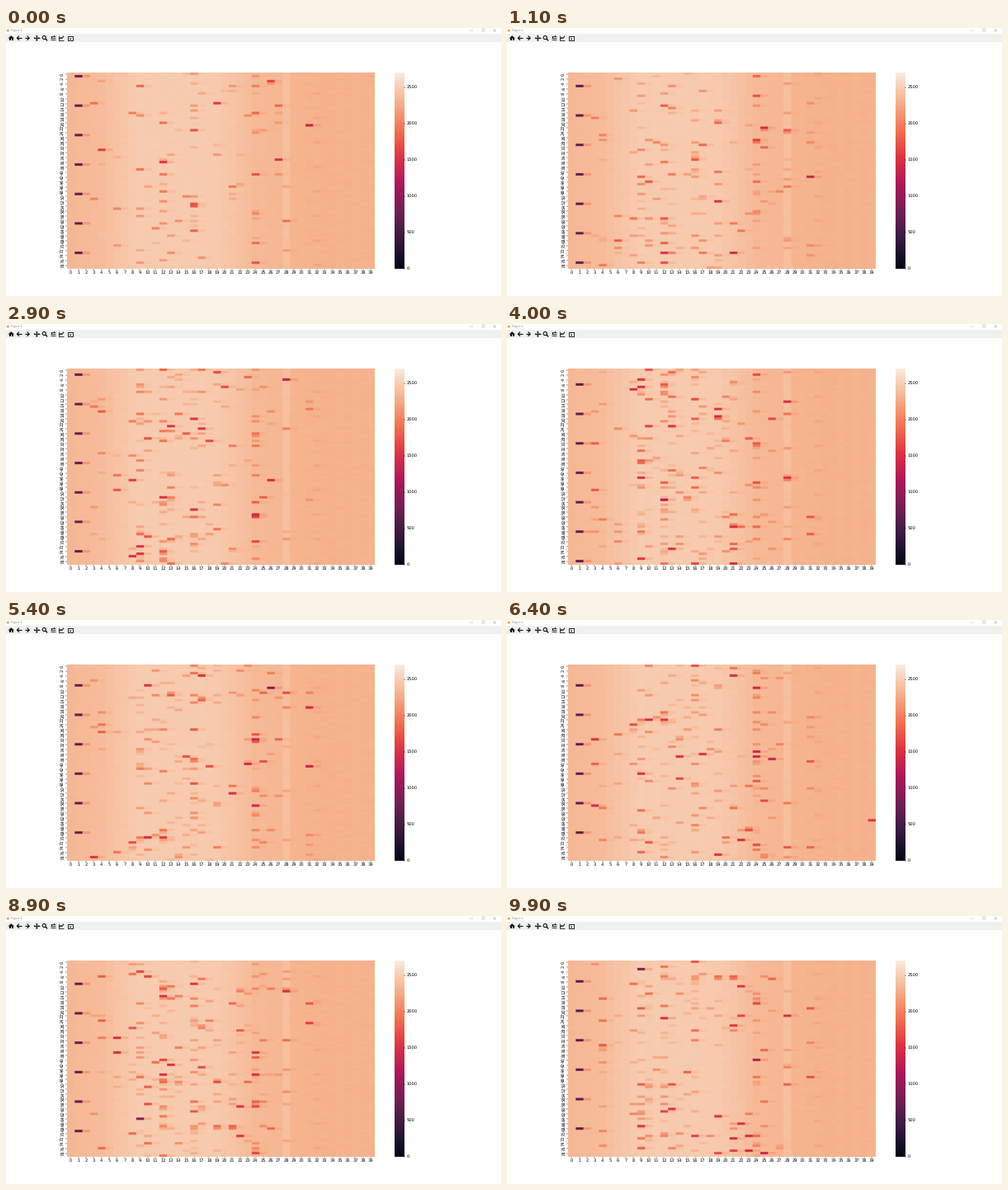
Recreate the animation shown at these times as a matplotlib script. Size 600 px wide and 325 px high, loop 10 s.

```python
import numpy as np
import matplotlib.pyplot as plt
from matplotlib.animation import FuncAnimation
from matplotlib.collections import LineCollection
from matplotlib.colors import LinearSegmentedColormap
from matplotlib.patches import Circle, Polygon, Rectangle

plt.rcParams["text.hinting"] = "no_hinting"
plt.rcParams["font.family"] = "DejaVu Sans"

W, H, DPI = 600, 325, 100
ROWS, COLS, VMAX = 80, 40, 2700
LEFT, RIGHT, TOP, BOTTOM = 73.8, 446.8, 54.4, 292.0
BAR_L, BAR_R = 470.8, 482.4
PX = 72 / DPI
LABEL = 5.1 * PX
INK, GREY = "#111111", "#8c8c8c"

# Scroll position in rows at a few ticks, and the ticks on which it stalls
TICKS = [0, 20, 40, 54, 64, 77, 99]
STARTS = [0, 123, 247, 329, 377, 458, 593]
STALLS = {30, 34, 46, 49, 52, 55, 58, 69, 73, 76, 88}

CMAP = LinearSegmentedColormap.from_list("ember", [
    (0, "#03051a"), (1 / 7, "#35193e"), (2 / 7, "#701f57"), (3 / 7, "#ad1759"),
    (4 / 7, "#e13342"), (5 / 7, "#f37651"), (6 / 7, "#f6b48f"), (1, "#faebdd")])

# Share of rows with a weak reading, by how busy the column is
BUSY = {0.22: (9, 12, 16, 24), 0.09: (4, 10, 13, 14, 17, 19, 21, 28),
        0.04: (3, 6, 8, 11, 15, 18, 20, 22, 23, 25, 26, 27, 31)}
# The few deepest drops: row, column, level
DEEP = [(35, 27, 1500), (183, 28, 1300), (300, 12, 1200), (338, 26, 900),
        (440, 39, 1550), (487, 16, 900), (596, 9, 900), (633, 24, 1250)]


def build_log():
    """All readings that pass through the window, one row per sample."""
    rng = np.random.default_rng(12)
    n = STARTS[-1] + ROWS
    level = np.interp(np.arange(COLS), [0, 4, 9, 19, 24, 31], [2335, 2375, 2475, 2465, 2350, 2300])
    level += rng.uniform(-5, 5, COLS)
    level[28] += 70
    base = level + rng.normal(0, 4, (n, COLS))
    drop = np.zeros((n, COLS))

    density = np.where(np.arange(n) < ROWS, 0.6, 1.0)
    for rate, group in BUSY.items():
        for col in group:
            rows = np.flatnonzero(rng.random(n) < rate * density)
            drop[rows, col] = np.minimum(90 + rng.exponential(260, len(rows)), 950)
    drop[8::10, 32] = 75
    drop[1::12, 1] = 1690
    for row, col, value in DEEP:
        drop[row, col] = base[row, col] - value

    log = base - drop
    log[:, 1:] -= 0.13 * drop[:, :-1]  # each drop leaks into the next column
    return log


def start_row(tick):
    if tick in STALLS:
        tick -= 1
    return int(round(np.interp(tick, TICKS, STARTS)))


def window(tick):
    """Visible cells, enlarged so that the resampling keeps crisp edges."""
    first = start_row(tick)
    return np.kron(LOG[first:first + ROWS], np.ones((6, 16)))


LOG = build_log()
fig = plt.figure(figsize=(W / DPI, H / DPI), dpi=DPI, facecolor="white")
ax = fig.add_axes([0, 0, 1, 1])
ax.axis("off")


def line(xs, ys, width=0.8, color=INK):
    ax.plot(xs, ys, color=color, lw=width * PX, solid_capstyle="butt")


def fill(points, color=INK):
    ax.add_patch(Polygon(points, fc=color, lw=0))


def box(x, y, w, h, color=INK, edge="none", width=0.0):
    ax.add_patch(Rectangle((x, y), w, h, fc=color, ec=edge, lw=width * PX))


def label(x, y, s, **kw):
    style = dict(fontsize=LABEL, color="black", ha="center", va="center")
    ax.text(x, y, s, **{**style, **kw})


def draw_title_bar():
    ax.add_patch(Circle((2.4, 3), 1.6, fc="#e8a26c", lw=0))
    label(6, 3.1, "Figure 1", ha="left", color=GREY, fontsize=3.8 * PX,
          family="Liberation Sans")
    line([562, 566], [3, 3], 0.4, GREY)
    box(577, 1.4, 3, 3, "none", GREY, 0.4)
    for y0, y1 in ((1.3, 4.7), (4.7, 1.3)):
        line([590.6, 594], [y0, y1], 0.4, GREY)


def draw_arrow(x, y, d):
    line([x - 2.6 * d, x + 2.8 * d], [y, y], 1.2)
    line([x - 0.1 * d, x - 2.6 * d, x - 0.1 * d], [y - 2.6, y, y + 2.6], 1.2)


def draw_toolbar():
    y = 12.2
    box(0, 7, W, 10.3, "#f0f0f0")
    # home
    fill([(2.6, y + 0.3), (6.2, y - 3.1), (9.8, y + 0.3)])
    box(3.8, y, 1.7, 2.8)
    box(6.9, y, 1.7, 2.8)
    box(5.2, y - 0.6, 2, 1.6)
    draw_arrow(16, y, 1)
    draw_arrow(25.5, y, -1)
    # pan
    cx = 37.3
    line([cx - 3.2, cx + 3.2], [y, y], 1)
    line([cx, cx], [y - 3, y + 3], 1)
    for dx, dy in ((1, 0), (-1, 0), (0, 1), (0, -1)):
        tip = np.array([cx + 3.6 * dx, y + 3.6 * dy])
        back, side = np.array([dx, dy]) * 1.7, np.array([dy, dx]) * 1.5
        fill([tip, tip - back + side, tip - back - side])
    # zoom
    ax.add_patch(Circle((46.3, y - 0.6), 2.1, fc="none", ec=INK, lw=1.1 * PX))
    line([47.8, 50.1], [y + 0.9, y + 3.2], 1.4)
    # sliders
    for dy, knob in ((-2.2, 58.2), (0, 55.6), (2.2, 57.6)):
        line([53.7, 60.1], [y + dy, y + dy], 0.8)
        box(knob - 0.6, y + dy - 0.9, 1.3, 1.8)
    # curve
    line([63.6, 63.6, 70.4], [y - 3, y + 2.8, y + 2.8], 0.8)
    line([64.6, 66.3, 67.6, 70], [y + 1.3, y - 0.7, y + 0.5, y - 2.4], 1.1)
    # save
    box(75.3, y - 2.7, 5.6, 5.5, "none", INK, 0.9)
    box(76.5, y - 2.6, 2.8, 1.7)
    ax.add_patch(Circle((78.1, y + 1.1), 0.9, fc=INK, lw=0))


def draw_scales():
    ticks = []
    dx, dy = (RIGHT - LEFT) / COLS, (BOTTOM - TOP) / ROWS
    for c in range(COLS):
        x = LEFT + (c + 0.5) * dx
        ticks.append([(x, BOTTOM), (x, BOTTOM + 1.5)])
        label(x, BOTTOM + 4.9, str(c))
    for r in range(0, ROWS, 2):
        y = TOP + (r + 0.5) * dy
        ticks.append([(LEFT - 1.5, y), (LEFT, y)])
        label(LEFT - 5.1, y, str(r), rotation=90)
    for v in range(0, VMAX, 500):
        y = BOTTOM - (BOTTOM - TOP) * v / VMAX
        ticks.append([(BAR_R, y), (BAR_R + 1.5, y)])
        label(BAR_R + 2.9, y, str(v), ha="left")
    ax.add_collection(LineCollection(ticks, colors="black", linewidths=0.4 * PX))


def show(data, left, right, **kw):
    return ax.imshow(data, cmap=CMAP, vmin=0, vmax=VMAX, aspect="auto",
                     extent=(left, right, BOTTOM, TOP), **kw)


draw_title_bar()
draw_toolbar()
heat = show(window(0), LEFT, RIGHT, interpolation="antialiased",
            interpolation_stage="rgba")
show(np.linspace(VMAX, 0, 256)[:, None], BAR_L, BAR_R, interpolation="nearest")
draw_scales()
ax.set_xlim(0, W)
ax.set_ylim(H, 0)


def update(tick):
    heat.set_data(window(tick))
    return [heat]


anim = FuncAnimation(fig, update, frames=100, interval=100, repeat=True,
                     repeat_delay=0, blit=False)
plt.show()
```
